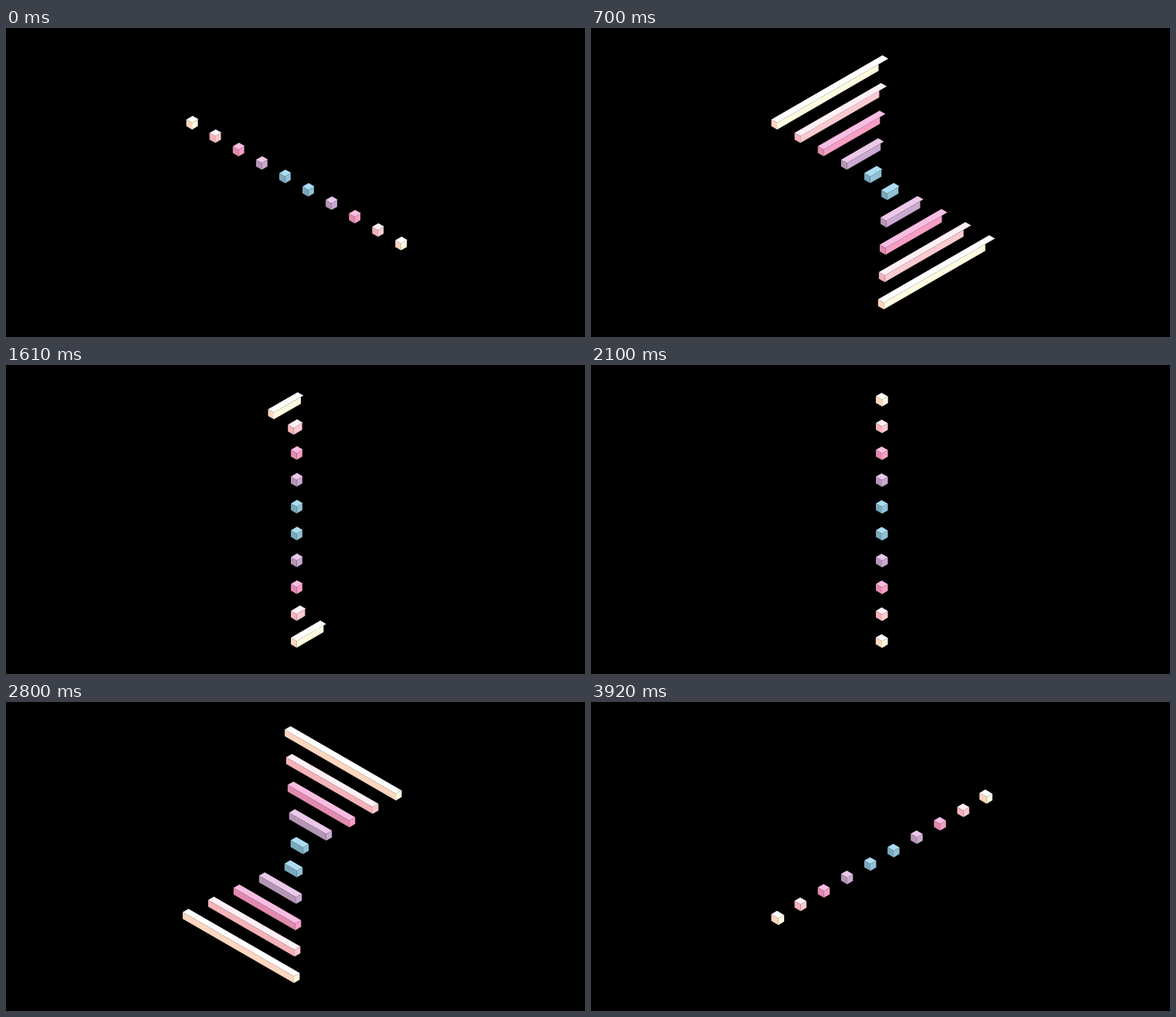
Animation, 750 px wide and 400 px high, one loop 3990 ms. Source, as an HTML page with a canvas:

```html
<!DOCTYPE html>
<html lang="en">
<head>
<meta charset="utf-8">
<title>Isometric bars</title>
<style>
  html, body { margin: 0; width: 100%; height: 100%; overflow: hidden; background: #000; }
  canvas { display: block; }
</style>
</head>
<body>
<canvas id="stage" width="750" height="400"></canvas>
<script>
const ctx = document.getElementById('stage').getContext('2d');
const LOOP = 3990, PHASE = 2100, STEP = 70;
const CX = 376.5, CY = 200.9;      // middle of the arrangement
const GAP = 30.1, SLOPE = 0.577;   // horizontal spacing, isometric slope
const W = 7.5, H = 8.67, UNIT = 8; // cube half width, edge height, stretch unit

// [top, left, right], from the middle pair outwards
const COLORS = [
  ['#abdcf2', '#7ba8bb', '#90c1d7'],
  ['#ecc9eb', '#b596b5', '#caaad0'],
  ['#f9bde3', '#e18bae', '#f59fc4'],
  ['#fff0f5', '#f3b3b9', '#fbcad0'],
  ['#ffffff', '#ffd6bf', '#fffbe0']
];

const clamp = v => Math.min(1, Math.max(0, v));
const mix = (a, b, p) => a + (b - a) * p;
function ease(v) {
  const u = clamp(v);
  return u < 0.5 ? 2 * u * u : 1 - 2 * (1 - u) * (1 - u);
}

function face(color, x, y, ax, ay, bx, by) {
  ctx.fillStyle = color;
  ctx.beginPath();
  ctx.moveTo(x, y);
  ctx.lineTo(x + ax, y + ay);
  ctx.lineTo(x + ax + bx, y + ay + by);
  ctx.lineTo(x + bx, y + by);
  ctx.fill();
}

// dir -1: the bar runs up to the right, dir 1: down to the right
function bar(x, y, size, dir, [top, left, right]) {
  const len = UNIT * size, rise = W * SLOPE;
  face(top, x, y, len, dir * len * SLOPE, W, -dir * rise);
  if (dir < 0) {
    const side = 7.3 * size;
    face(left, x, y, W, rise, 0, H);
    face(right, x + W, y + rise, side, -side * SLOPE, 0, H);
  } else {
    face(left, x, y, len, len * SLOPE, 0, H);
    face(right, x + len, y + len * SLOPE, W, -rise, 0, H);
  }
}

function draw(t) {
  ctx.fillStyle = '#000';
  ctx.fillRect(0, 0, 750, 400);
  const dir = t < PHASE ? -1 : 1;
  const time = t % PHASE;
  const [near, far] = dir < 0 ? [0, 7.8] : [0.47, 8.24];
  const slide = ease((time - 670) / 415);

  for (let i = 0; i < 10; i++) {
    const k = i - 4.5, n = Math.abs(k);
    // growing bars end together, shrinking bars start together
    const grow = ease(1 - (670 - time) / (153 * n));
    const shrink = ease((time - 1085) / (179 * (n - 0.1)));
    const extra = (4 * n - 1) * (grow - shrink);

    const diagonal = GAP * k, column = 0;
    const from = dir < 0 ? diagonal : column;
    const to = dir < 0 ? column : -diagonal;
    const start = from - extra * (k < 0 ? near : far);
    const end = to - extra * (k < 0 ? far : near);
    const dx = mix(start, end, slide);

    const baseY = CY + (dir < 0 ? 2 * GAP * SLOPE * k : 2 * GAP * SLOPE * k);
    bar(CX + dx - W, baseY + dir * dx * SLOPE - W * SLOPE,
        1 + extra, dir, COLORS[Math.floor(n)]);
  }
}

function tick() {
  const t = performance.now() % LOOP;
  draw(Math.floor(t / STEP) * STEP);
  requestAnimationFrame(tick);
}
tick();
</script>
</body>
</html>
```
